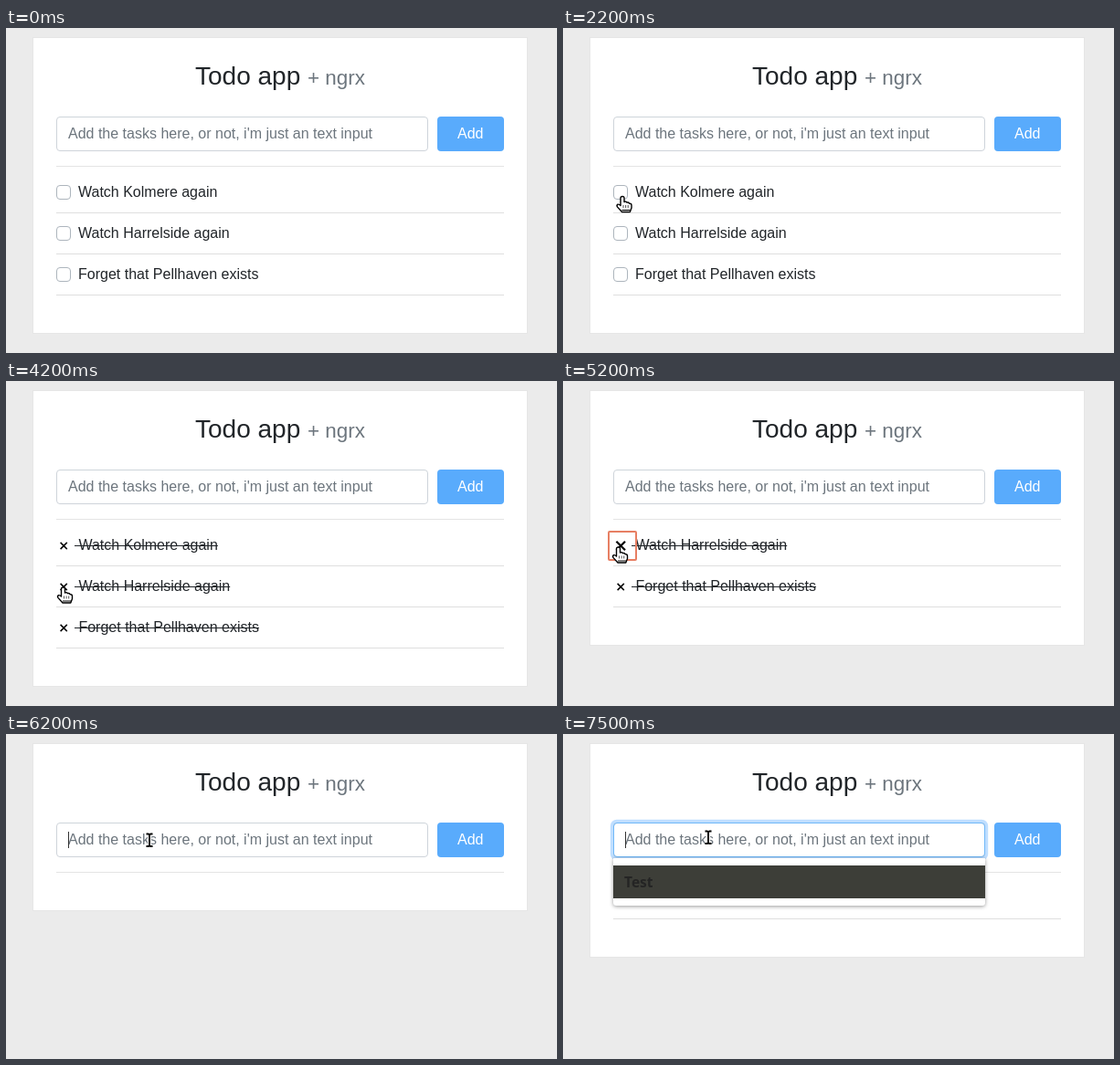
Recreate the animation shown at these times as an HTML page with a canvas. Size 603 px wide and 356 px high, loop 8000 ms.

```html
<!DOCTYPE html>
<html lang="en">
<head>
<meta charset="utf-8">
<title>Todo app</title>
<style>
  html, body { margin: 0; width: 100%; height: 100%; overflow: hidden; background: #ebebeb; }
  canvas { display: block; }
</style>
</head>
<body>
<canvas id="stage" width="603" height="356"></canvas>
<script>
const ctx = document.getElementById('stage').getContext('2d');
const LOOP = 8000, STEP = 100;
const SANS = '"Liberation Sans", Arial, sans-serif';
const MENU_FONT = '600 15.5px "Noto Sans", sans-serif';
const INK = '#212529', MUTED = '#6c757d';
const ROW_TOP = 157, ROW_H = 45;

const tasks = [
  { text: 'Watch Kolmere again', from: 0, done: 2400, gone: 4700 },
  { text: 'Watch Harrelside again', from: 0, done: 2900, gone: 5300 },
  { text: 'Forget that Pellhaven exists', from: 0, done: 3700, gone: 5700 },
  { text: 'Test', from: 7500, done: Infinity, gone: Infinity }
];
const suggestions = ['Test', 'asdasd', 'fruta', 'popleta', 'aasdasd', 'Fruta'];

// Pointer path: time, x, y
const path = [
  [800, 255, 38], [1000, 249, 62], [1100, 237, 92], [1200, 234, 101], [1300, 234, 101],
  [1400, 200, 122], [1500, 163, 147], [1600, 163, 147], [1700, 139, 160], [1900, 66, 188],
  [2100, 66, 188], [2300, 64, 181], [2500, 64, 183], [2800, 65, 222], [3000, 64.5, 224],
  [3300, 64, 250], [3600, 63, 268], [3900, 64, 273], [4000, 64, 266], [4400, 61, 186],
  [4700, 60.5, 182], [5700, 60.5, 182], [5800, 66, 176], [6000, 115, 150], [6100, 146, 122],
  [6200, 157, 116], [6400, 159, 113], [LOOP, 159, 113]
];

// Periods in which the first row's cross is hovered or pressed
const hovers = [[4400, 4700], [4900, 5300], [5400, 5700]];
const presses = [[4600, 4700], [5200, 5300], [5600, 5700]];
const during = (t, [start, end]) => t >= start && t < end;

function pointerAt(t) {
  const i = path.findIndex(p => p[0] > t);
  const [t0, x0, y0] = path[i - 1], [t1, x1, y1] = path[i];
  const k = (t - t0) / (t1 - t0);
  return { x: x0 + (x1 - x0) * k, y: y0 + (y1 - y0) * k };
}

function fill(color, x, y, w, h) {
  ctx.fillStyle = color;
  ctx.fillRect(x, y, w, h);
}

function box(x, y, w, h, r, color, line) {
  ctx.beginPath();
  ctx.roundRect(x, y, w, h, r);
  if (color) { ctx.fillStyle = color; ctx.fill(); }
  if (line) { ctx.strokeStyle = line; ctx.lineWidth = 1; ctx.stroke(); }
}

function text(str, x, y, color, font = '16px ' + SANS) {
  ctx.font = font;
  ctx.fillStyle = color;
  ctx.fillText(str, x, y);
  return ctx.measureText(str).width;
}

function cross(x, y, grow) {
  const r = 3.6 + 1.2 * grow;
  ctx.beginPath();
  ctx.moveTo(x - r, y - r); ctx.lineTo(x + r, y + r);
  ctx.moveTo(x + r, y - r); ctx.lineTo(x - r, y + r);
  ctx.strokeStyle = '#000';
  ctx.lineWidth = 1.5 + 0.7 * grow;
  ctx.stroke();
}

function drawRow(task, index, t) {
  const top = ROW_TOP + index * ROW_H;
  fill('#dfdfdf', 55, top + 45, 490, 1);
  if (t < task.done) {
    box(55.5, top + 15.5, 15, 15, 3.5, '#fff', '#adb5bd');
    text(task.text, 79, top + 28, INK);
    return;
  }
  const hover = index === 0 && hovers.find(h => during(t, h));
  const grow = hover ? Math.min(1, (t - hover[0] + STEP) / 200) : 0;
  cross(63.2, top + 23.5, grow);
  const width = text(task.text, 79.45, top + 28, INK);
  fill(INK, 75, top + 23, width + 4.5, 1);
  if (index === 0 && presses.some(p => during(t, p))) {
    ctx.strokeStyle = '#e77f63';
    ctx.lineWidth = 2;
    ctx.beginPath();
    ctx.roundRect(50, 165, 30, 31, 1);
    ctx.stroke();
  }
}

function drawField(t, typed) {
  const focus = Math.max(0, Math.min(1, (t - 6200) / 200));
  if (focus) {
    ctx.globalAlpha = focus;
    box(51.8, 93.8, 413.4, 44.4, 7, '#bfdeff');
    ctx.globalAlpha = 1;
  }
  box(55.5, 97.5, 406, 37, 3.5, '#fff', '#ced4da');
  if (focus) {
    ctx.globalAlpha = focus;
    box(55.5, 97.5, 406, 37, 3.5, null, '#70b8f8');
    ctx.globalAlpha = 1;
  }
  const width = typed
    ? text(typed, 68, 121, '#495057')
    : text("Add the tasks here, or not, i'm just an text input", 68, 121, MUTED) * 0;
  if (t >= 6200 && !during(t, [6900, 7000])) fill('#333', 68 + Math.round(width), 107, 1, 18);
  box(472, 97, 73, 38, 4, typed ? '#007bff' : '#59abfc');
  text('Add', 494, 121, '#fff');
}

function drawMenu(t) {
  const list = t < 7000 ? suggestions : suggestions.slice(0, 1);
  ctx.save();
  ctx.shadowColor = 'rgba(0,0,0,.4)';
  ctx.shadowBlur = 4;
  ctx.shadowOffsetY = 1;
  box(55, 136, 407, list.length * 36 + 16, [0, 0, 3, 3], '#fff');
  ctx.restore();
  if (t >= 7200) fill('#3d3e38', 55, 144, 407, 36);
  list.forEach((word, i) => text(word, 67, 168 + i * 36, '#242424', MENU_FONT));
}

const hand = new Path2D('M-2 10V1.8Q-2 0 0 0Q2 0 2 1.8V6Q4 5 5 6.7Q7 6 7.6 7.7Q10 7.4 10 10V12.5L8.3 17H-.5L-5.6 11.4Q-6.6 9.6-5 8.7Q-3.8 8.2-2 10Z');
const arrow = new Path2D('M0 0V16L3.8 12.6L6.4 18.2L9 17L6.5 11.6H11.5Z');
const beam = new Path2D('M-3.5-6.5H-1.2L0-5.7L1.2-6.5H3.5M0-6V6.5M-3.5 7H-1.2L0 6.2L1.2 7H3.5');

function drawPointer(t) {
  if (t < 800) return;
  const { x, y } = pointerAt(t);
  const overText = y < 70 || (y >= 97 && y <= 135 && x > 55 && x < 462);
  const overBox = t >= 2200 && x < 72;
  ctx.save();
  ctx.translate(x, y);
  ctx.lineJoin = 'round';
  if (overText) {
    ctx.strokeStyle = '#fff';
    ctx.lineWidth = 4;
    ctx.stroke(beam);
    ctx.strokeStyle = '#000';
    ctx.lineWidth = 1.9;
    ctx.stroke(beam);
  } else {
    const shape = overBox ? hand : arrow;
    ctx.fillStyle = '#fff';
    ctx.fill(shape);
    ctx.strokeStyle = '#000';
    ctx.lineWidth = 1.4;
    ctx.stroke(shape);
    if (overBox) {
      for (let i = 0; i < 3; i++) fill('#555', i * 2.6 + 0.5, 9.5, 1, 3);
      fill('#000', -0.5, 14.5, 9, 1);
    }
  }
  ctx.restore();
}

function typedAt(t) {
  if (t < 7000 || t >= 7500) return '';
  return t < 7100 ? 'T' : t < 7200 ? 'Te' : 'Test';
}

function draw(t) {
  const rows = tasks.filter(task => during(t, [task.from, task.gone]));
  const bottom = rows.length ? 199 + rows.length * ROW_H : 193;
  fill('#ebebeb', 0, 0, 603, 356);
  fill('#e6e6e6', 29, 10, 542, bottom - 9);
  fill('#fff', 30, 11, 540, bottom - 11);
  text('Todo app', 207, 62, INK, '28px ' + SANS);
  text('+ ngrx', 330, 62, MUTED, '22.4px ' + SANS);
  fill('#e4e4e4', 55, 151, 490, 1);
  rows.forEach((task, i) => drawRow(task, i, t));
  drawField(t, typedAt(t));
  if (t >= 6400) drawMenu(t);
  drawPointer(t);
}

const start = performance.now();
function tick() {
  const t = (performance.now() - start) % LOOP;
  draw(Math.floor(t / STEP) * STEP);
  requestAnimationFrame(tick);
}
tick();
</script>
</body>
</html>
```
